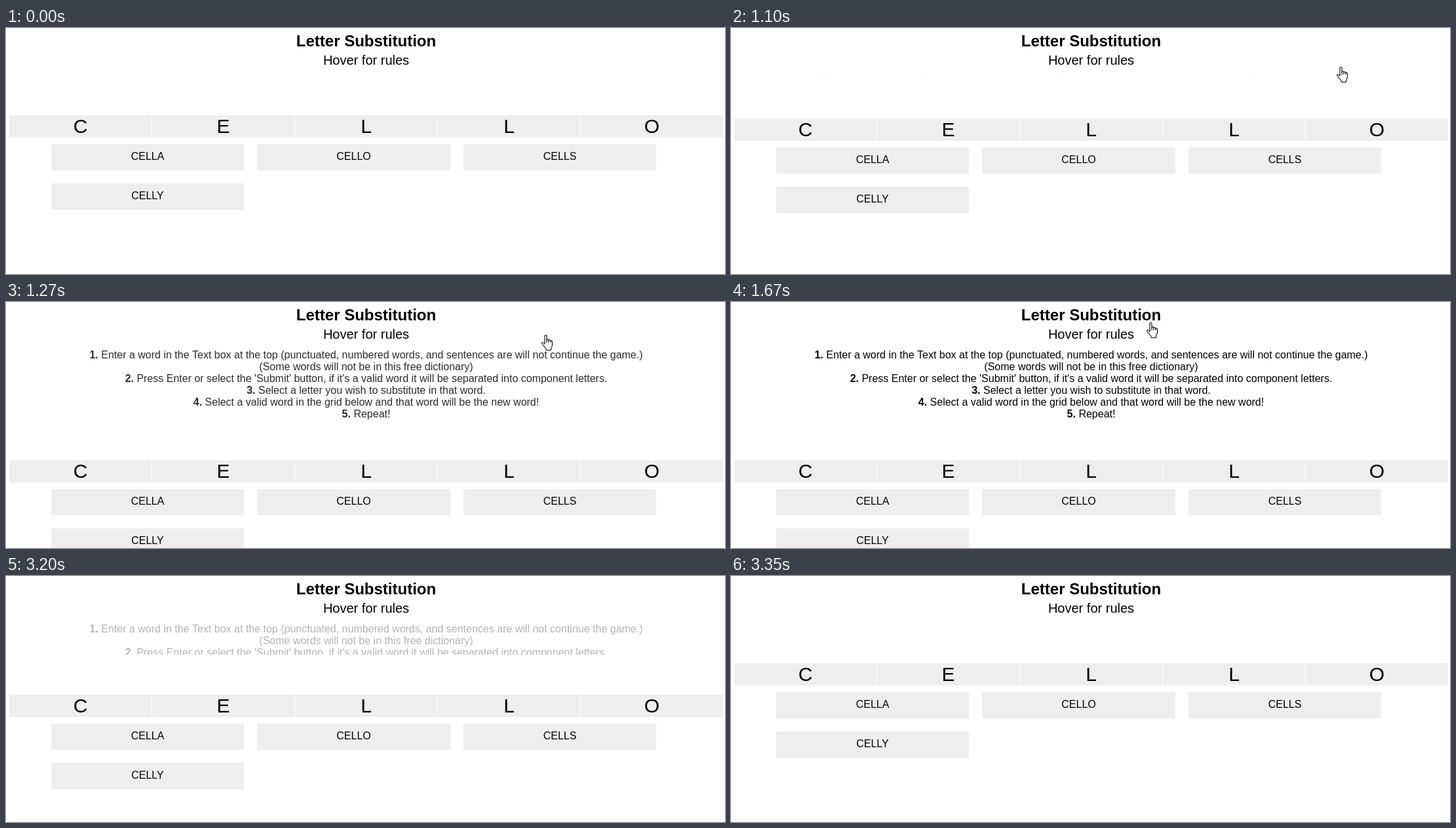
Recreate the animation shown at these times as an HTML page with a canvas. Size 1097x375 px, loop 3820 ms.

```html
<!DOCTYPE html>
<html lang="en">
<head>
<meta charset="utf-8">
<title>Letter Substitution</title>
<style>
html, body { margin: 0; width: 100%; height: 100%; overflow: hidden; background: #fff; }
canvas { display: block; }
</style>
</head>
<body>
<canvas id="stage" width="1097" height="375"></canvas>
<script>
const ctx = document.getElementById('stage').getContext('2d');
const W = 1097, H = 375, LOOP = 3820, MID = 549.5;
const FONT = '"Liberation Sans", Arial, sans-serif';

const RULES = [
  ['1.', ' Enter a word in the Text box at the top (punctuated, numbered words, and sentences are will not continue the game.)'],
  ['', '(Some words will not be in this free dictionary)'],
  ['2.', " Press Enter or select the 'Submit' button, if it's a valid word it will be separated into component letters."],
  ['3.', ' Select a letter you wish to substitute in that word.'],
  ['4.', ' Select a valid word in the grid below and that word will be the new word!'],
  ['5.', ' Repeat!']
];
const WORDS = ['CELLA', 'CELLO', 'CELLS', 'CELLY'];
const COLS = [[69, 294], [383, 295], [698, 294]];

const PANEL = { top: 72, line: 18, limit: 160 };
const OPEN = { start: 1085, time: 350 };
const CLOSE = { start: 3085, time: 280 };

// Pointer keys: time, left, top
const ENTER = [
  [520, 1093, 108], [800, 1050, 87], [1040, 967, 66], [1100, 925, 59],
  [1170, 883, 56], [1290, 805, 49], [1370, 755, 44], [1570, 635, 31], [1670, 635, 31]
];
const REST = [[1670, 634, 31], [2940, 634, 31]];
const LEAVE = [
  [2940, 643, 31], [3000, 755, 46], [3060, 925, 61], [3100, 1010, 76], [3160, 1098, 105]
];

const HAND = new Path2D(
  'M5 14V2Q5 .5 6.5 .5Q8 .5 8 2V8Q8 6.8 9.5 6.8Q11 7 11 8.6Q11 7.6 12.5 7.8' +
  'Q14 8 14 9.6Q14 8.8 15.2 9Q16.5 9.3 16.5 11V15Q16.5 18 14.5 20.5V22.5' +
  'Q14.5 23.5 13.5 23.5H8Q7 23.5 7 22.5V21.5Q4.5 18.5 .8 13.5Q.3 12 1.5 11.7Q3 11.5 5 14Z');
const KNUCKLES = new Path2D('M8 8V12M11 8.5V12M14 9.5V12');

const clamp = v => Math.min(1, Math.max(0, v));

// cubic-bezier(.25, .1, .25, 1)
function ease(x) {
  if (x <= 0 || x >= 1) return clamp(x);
  let lo = 0, hi = 1;
  for (let i = 0; i < 24; i++) {
    const s = (lo + hi) / 2;
    if (0.75 * s * (1 - s) + s ** 3 < x) lo = s; else hi = s;
  }
  return 0.3 * lo * (1 - lo) ** 2 + 3 * lo * lo * (1 - lo) + lo ** 3;
}

function progress(t) {
  const phase = p => ease(clamp((t - p.start) / p.time));
  return t < CLOSE.start ? phase(OPEN) : 1 - phase(CLOSE);
}

function along(keys, t) {
  const i = keys.findIndex((k, n) => n > 0 && t <= k[0]);
  if (i < 0) return null;
  const [t0, x0, y0] = keys[i - 1], [t1, x1, y1] = keys[i];
  const u = (t - t0) / (t1 - t0);
  return [Math.round(x0 + (x1 - x0) * u), Math.round(y0 + (y1 - y0) * u)];
}

function pointer(t) {
  if (t < 520) return null;
  return along(t < 1670 ? ENTER : t < 2940 ? REST : LEAVE, t);
}

function label(str, x, y, size, weight = 'normal') {
  ctx.font = `${weight} ${size}px ${FONT}`;
  ctx.textAlign = 'center';
  ctx.fillStyle = '#000';
  ctx.fillText(str, x, y);
}

function box(x, y, w, h) {
  ctx.fillStyle = '#eee';
  ctx.fillRect(x, y, w, h);
}

function drawRule([num, text], y) {
  const bold = `bold 16px ${FONT}`, plain = `16px ${FONT}`;
  ctx.textAlign = 'left';
  ctx.font = bold;
  const numW = ctx.measureText(num).width;
  ctx.font = plain;
  const x = MID - (numW + ctx.measureText(text).width) / 2;
  ctx.fillText(text, x + numW, y);
  ctx.font = bold;
  ctx.fillText(num, x, y);
}

function drawRules(height, alpha) {
  if (!height) return;
  ctx.save();
  ctx.beginPath();
  ctx.rect(0, PANEL.top, W, height);
  ctx.clip();
  ctx.globalAlpha = alpha;
  ctx.fillStyle = '#000';
  RULES.forEach((rule, i) => drawRule(rule, PANEL.top + 14 + i * PANEL.line));
  ctx.restore();
}

function drawGrid(top) {
  [...'CELLO'].forEach((ch, i) => {
    box(5 + i * 218, top, 217, 34);
    label(ch, 113.5 + i * 218, top + 27, 30);
  });
  WORDS.forEach((word, i) => {
    const [x, w] = COLS[i % 3], y = top + 44 + Math.floor(i / 3) * 60;
    box(x, y, w, 40);
    label(word, x + w / 2, y + 24, 16);
  });
}

function drawHand([x, y]) {
  ctx.save();
  ctx.translate(x, y);
  ctx.fillStyle = '#fff';
  ctx.strokeStyle = '#000';
  ctx.lineWidth = 1.1;
  ctx.lineJoin = 'round';
  ctx.fill(HAND);
  ctx.stroke(HAND);
  ctx.stroke(KNUCKLES);
  ctx.restore();
}

function draw(t) {
  const p = progress(t);
  const height = Math.round(Math.min(RULES.length * PANEL.line, p * PANEL.limit));
  ctx.fillStyle = '#fff';
  ctx.fillRect(0, 0, W, H);
  label('Letter Substitution', MID, 28, 24, 'bold');
  label('Hover for rules', MID, 56, 20);
  drawRules(height, p);
  drawGrid(133 + height);
  const at = pointer(t);
  if (at) drawHand(at);
}

const begin = performance.now();
function tick() {
  draw((performance.now() - begin) % LOOP);
  requestAnimationFrame(tick);
}
tick();
</script>
</body>
</html>
```
